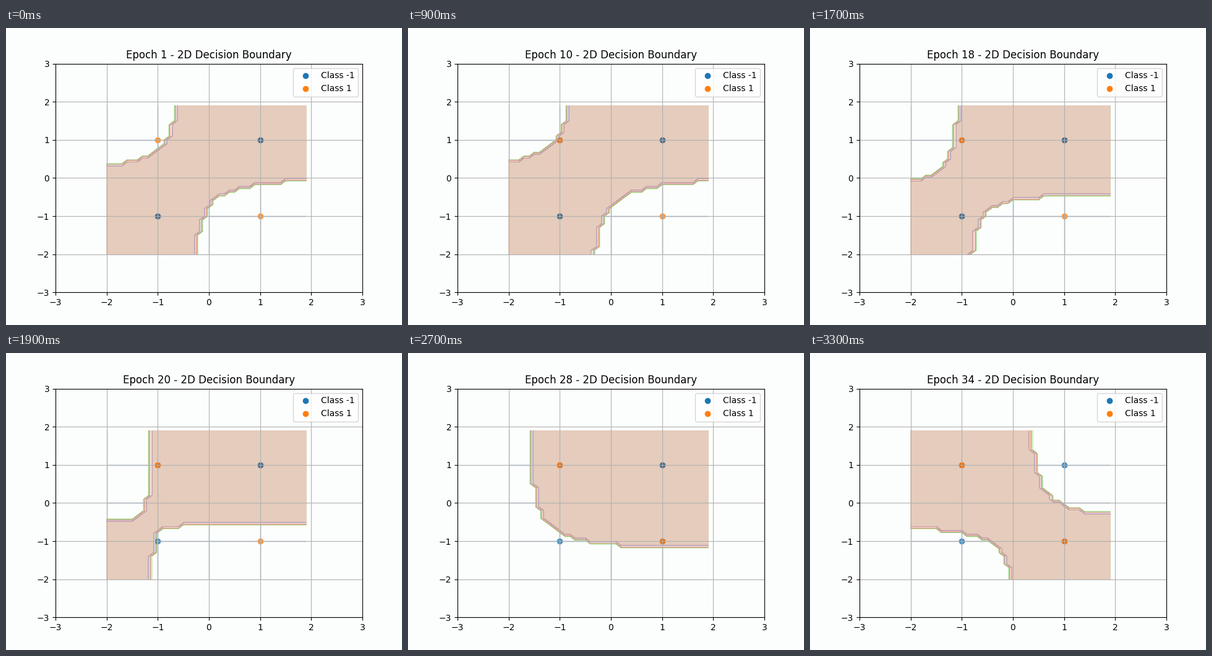
Animation of 640 by 480 pixels, one loop 3400 ms. Source, as a matplotlib script:

```python
import numpy as np
import matplotlib.pyplot as plt
from matplotlib.animation import FuncAnimation

EPOCHS, STEP_MS = 34, 100
PAPER = (252 / 255, 254 / 255, 253 / 255)

axis = np.arange(-2, 2, 0.1)
xx, yy = np.meshgrid(axis, axis)

LEVELS = np.linspace(-1, 1, 9)
mids = (LEVELS[:-1] + LEVELS[1:]) / 2
BANDS = plt.get_cmap("Paired")((mids + 1) / 2, alpha=0.3)
BANDS[0] = (*PAPER, 0.2)
BANDS[1, 3] = 0.5


def ramp(t, start, end):
    return min(max((t - start) / (end - start), 0), 1)


def predict(epoch):
    """Sign of 1 + a*x + b*y + c*x*y, whose weights drift in phases."""
    settle = ramp(epoch, 1, 5)
    tilt = ramp(epoch, 11, 20)
    join = ramp(epoch, 20, 24)
    widen = ramp(epoch, 24, 28)
    flip = ramp(epoch, 28, 34)
    a = -0.273 + 1.094 * tilt - 0.121 * widen - 1.804 * flip
    b = 1.32 + 0.453 * tilt - 0.811 * join - 0.035 * widen - 0.455 * flip
    c = (3.06 - 0.62 * settle - 0.892 * tilt - 0.819 * join
         - 0.187 * widen - 2.759 * flip)
    return np.where(1 + a * xx + b * yy + c * xx * yy > 0, 1.0, -1.0)


fig, ax = plt.subplots(figsize=(6.4, 4.8), dpi=100, facecolor=PAPER)
ax.set_facecolor(PAPER)

# Pale rims of the grid lines, visible only inside the class -1 area
rims = []
for t in range(-2, 2):
    for xs, ys in (([t, t], [-2, 1.9]), ([-2, 1.9], [t, t])):
        rims += ax.plot(xs, ys, color="#dbe8f0", lw=2.16, zorder=0.9,
                        solid_capstyle="butt")

ax.scatter([1, -1], [1, -1], color="C0", label="Class -1")
ax.scatter([1, -1], [-1, 1], color="C1", label="Class 1")
ax.grid(True)
ax.legend(loc="upper right")
title = ax.set_title("")
regions = None


def update(i):
    global regions
    if regions is not None:
        regions.remove()
    epoch = i + 1
    regions = ax.contourf(xx, yy, predict(epoch), levels=LEVELS, colors=BANDS)
    ax.set(xlim=(-3, 3), ylim=(-3, 3))
    for rim in rims:
        rim.set_clip_path(regions.get_paths()[0], ax.transData)
    title.set_text(f"Epoch {epoch} - 2D Decision Boundary")
    return [regions, title, *rims]


anim = FuncAnimation(fig, update, frames=EPOCHS, interval=STEP_MS,
                     repeat=True, blit=False)
plt.show()
```
